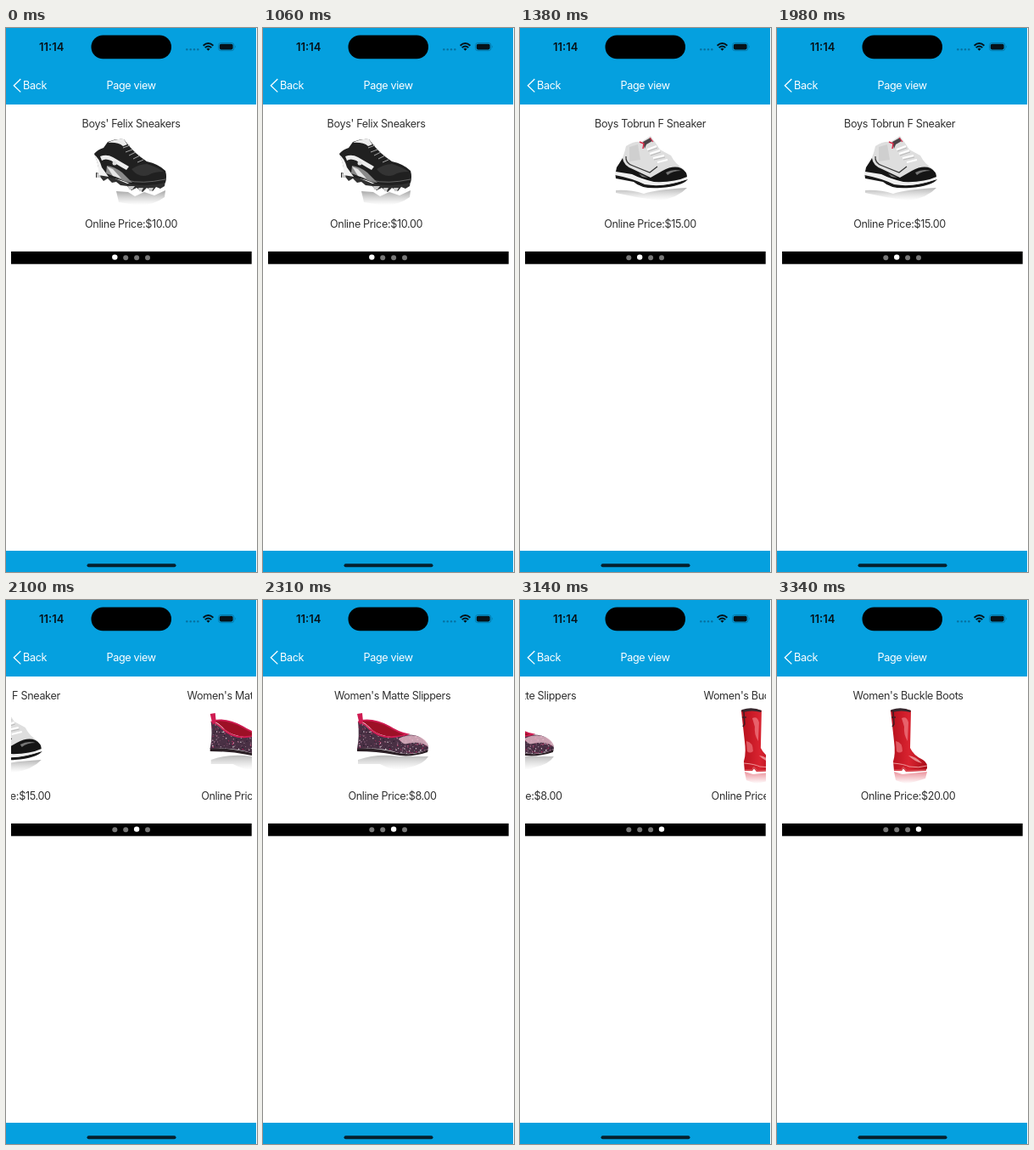
An HTML page that plays this animation: 296x640 px, repeating every 3440 ms.

```html
<!DOCTYPE html>
<html lang="en">
<head>
<meta charset="utf-8">
<title>Page view</title>
<style>
html, body { margin: 0; width: 100%; height: 100%; overflow: hidden; background: #fff; }
svg { display: block; width: 296px; height: 640px; }
text { font: 12.6px Inter, Roboto, sans-serif; letter-spacing: -0.34px; }
.label { fill: #303030; text-anchor: middle; }
</style>
</head>
<body>
<svg viewBox="0 0 296 640" xmlns="http://www.w3.org/2000/svg">
  <defs>
    <clipPath id="view"><rect x="6" y="90" width="284" height="172"/></clipPath>
    <linearGradient id="fade" x1="0" y1="0" x2="0" y2="1">
      <stop offset="0" stop-color="#666" stop-opacity=".6"/>
      <stop offset="1" stop-color="#999" stop-opacity="0"/>
    </linearGradient>
    <linearGradient id="redFade" x1="0" y1="0" x2="0" y2="1">
      <stop offset="0" stop-color="#d8283a" stop-opacity=".5"/>
      <stop offset="1" stop-color="#d8283a" stop-opacity="0"/>
    </linearGradient>
    <linearGradient id="bootRed" x1="0" y1="0" x2="1" y2="0">
      <stop offset="0" stop-color="#b5101c"/>
      <stop offset=".5" stop-color="#d92330"/>
      <stop offset="1" stop-color="#a80d18"/>
    </linearGradient>
    <clipPath id="flatBody"><path d="M112 143Q118 145 124 151Q139 164 158 160Q177 156 186 162Q196 168 195 176Q178 183 160 180Q138 173 111 175Q114 160 112 143Z"/></clipPath>
  </defs>

  <rect width="296" height="640" fill="#fff"/>
  <g clip-path="url(#view)">
    <g id="strip">
      <g class="page">
        <path d="M130 192L144 193L152 198L163 193L175 197L188 191L187 199Q172 210 152 208L133 205Z" fill="url(#fade)"/>
        <path d="M106 170L121 174L143 183L188 180L187 186L182 189L177 187L173 192L166 188L161 193L154 188L148 191L143 186L135 185L130 181L125 182L120 177L115 180L111 175L106 176Z" fill="#303030"/>
        <path d="M144 186h8l-3 4h-4ZM156 188h6l-2 4h-3ZM168 188h6l-2 4h-3ZM107 171l5 1-1 4h-4Z" fill="#c9c9c9"/>
        <path d="M104 148Q108 143 115 141L120 134Q130 130 139 131L143 136Q151 147 166 157Q180 160 188 168Q190 175 188 182Q168 187 148 184Q136 178 122 176L110 173Q110 162 104 148Z" fill="#202020"/>
        <path d="M120 135Q130 130 139 131L143 137L138 139Q132 134 120 135Z" fill="#ececec"/>
        <path d="M104 149Q110 153 113 164L121 175L109 173Q110 162 104 149Z" fill="#f2f2f2"/>
        <path d="M111 151Q119 148 126 152L145 163L142 167Q131 161 124 156Q117 153 113 156Z" fill="#ededed"/>
        <path d="M119 162Q128 163 137 170L149 182Q139 181 129 175L118 171Z" fill="#8a8a8a"/>
        <path d="M119 163L126 166L136 177L126 174Z" fill="#e5e5e5"/>
        <path d="M148 166Q157 160 166 160Q177 163 186 169Q174 169 168 173Q157 177 148 166Z" fill="#343434"/>
        <path d="M138 141l8-3M141 146l8-3M145 150l8-4M150 154l8-4M155 158l7-3" stroke="#aaa" stroke-width="1"/>
        <path d="M142 179Q160 184 188 178" stroke="#777" fill="none" stroke-width=".8"/>
        <circle cx="128" cy="159" r="2.5" fill="#ddd"/>
      </g>
      <g class="page">
        <g transform="translate(-6)">
          <path d="M113 191Q130 190 146 195Q160 190 197 188Q186 200 164 203Q139 200 113 194Z" fill="url(#fade)" opacity=".8"/>
          <path d="M112 169L118 172Q132 175 143 182Q164 187 183 182L198 178Q191 186 166 188Q144 190 134 181L113 177Z" fill="#181818"/>
          <path d="M112 168Q132 170 145 179Q165 184 197 175L197 178Q170 188 147 184Q133 177 112 173Z" fill="#efefef"/>
          <path d="M115 163Q122 154 125 139Q134 133 143 134L154 127Q160 135 165 143L178 150Q183 160 193 166L197 175Q178 181 155 180Q139 176 115 163Z" fill="#dedede"/>
          <path d="M114 164Q118 158 121 153Q122 162 133 166L154 176L168 168Q181 161 190 165Q197 169 197 175Q182 182 158 181Q144 178 132 172L113 169Z" fill="#151515"/>
          <path d="M125 151Q124 159 133 162L153 170L162 163" fill="none" stroke="#333" stroke-width="1.2"/>
          <path d="M129 140L139 137L142 155L129 157Z" fill="#cfcfcf"/>
          <path d="M145 134L154 129L156 133L149 137L147 142Z" fill="#4a4145"/>
          <path d="M141 134L146 136L145 142" fill="none" stroke="#d72b4a" stroke-width="1.5"/>
          <path d="M153 129l4 5" stroke="#d72b4a" stroke-width="1.2"/>
          <path d="M150 143l11-4M153 148l12-4M157 153l13-3M162 158l12-3" stroke="#fff" stroke-width="2"/>
          <path d="M151 145l11-4M154 150l12-4M158 155l13-3" stroke="#a9a9a9" stroke-width=".7"/>
          <path d="M172 170Q181 165 190 168Q180 168 174 173ZM140 171L151 176L144 175Z" fill="#777"/>
        </g>
      </g>
      <g class="page">
        <g transform="translate(-5)">
          <path d="M112 188Q135 180 160 184L195 184Q190 193 172 197Q158 204 138 193L112 193Z" fill="url(#fade)" opacity=".75"/>
          <path d="M111 174Q137 174 160 180Q180 184 195 175L194 179Q173 186 155 182Q134 178 111 178Z" fill="#2b2026"/>
          <path d="M112 143Q118 145 124 151Q139 164 158 160Q177 156 186 162Q196 168 195 176Q178 183 160 180Q138 173 111 175Q114 160 112 143Z" fill="#493044"/>
          <g id="glitter" clip-path="url(#flatBody)"></g>
          <path d="M160 163Q174 156 187 162Q195 167 195 173Q186 165 170 169Q165 171 160 163Z" fill="#e9bccb" opacity=".8"/>
          <path d="M114 142Q128 139 146 147Q161 156 169 158Q157 163 145 160Q131 157 125 149Q120 144 114 142Z" fill="#9d1026"/>
          <path d="M112 143Q120 145 126 152Q139 163 154 161Q164 160 170 158Q160 156 149 149Q131 139 115 142" fill="none" stroke="#cf1c52" stroke-width="1.8"/>
          <path d="M111 134L117 133L118 143L114 147Z" fill="#cf1c52"/>
        </g>
      </g>
      <g class="page">
        <g transform="translate(-7)">
          <path d="M138 202L148 205L177 202L175 210Q160 215 151 216L140 212Z" fill="url(#redFade)"/>
          <path d="M134 130Q146 126 158 130L157 174Q161 183 172 188Q178 192 177 198L175 201L152 202L148 197L147 201H138L137 190Q140 181 138 166Z" fill="url(#bootRed)"/>
          <path d="M135 129Q147 125 158 130L157 132Q147 129 136 132Z" fill="#36282e"/>
          <path d="M134 130l3 1 1 15 -2 3M135 138h5" fill="none" stroke="#431b21" stroke-width="1.6"/>
          <path d="M147 139Q153 136 155 144L154 166Q149 158 150 149Z" fill="#ef7880" opacity=".75"/>
          <path d="M140 166Q148 167 148 178Q144 181 141 178Z" fill="#ec737b" opacity=".7"/>
          <path d="M155 183Q164 184 171 192Q162 190 155 183Z" fill="#f3a2a5" opacity=".8"/>
          <path d="M137 192Q150 193 156 196Q167 198 177 195" fill="none" stroke="#ef9799"/>
          <path d="M138 200h9l2-3 4 4 23-1" fill="none" stroke="#d74b53" stroke-width="1.5"/>
        </g>
      </g>
    </g>
  </g>

  <rect x="6" y="262.9" width="283.7" height="14.8" fill="#000"/>
  <g id="dots"></g>

  <rect width="295" height="90" fill="#05a0df"/>
  <rect y="615" width="295" height="25" fill="#05a0df"/>
  <rect x="95.5" y="630.2" width="105" height="4" rx="2" fill="#05202e"/>
  <rect x="100.5" y="8.5" width="94.5" height="27.8" rx="13.9" fill="#000"/>
  <text x="39" y="26.7" style="font-size:13px;font-weight:600;letter-spacing:0" fill="#061219">11:14</text>
  <g fill="#0672a2">
    <circle cx="213.3" cy="25.3" r="1.2"/><circle cx="217.7" cy="25.3" r="1.2"/>
    <circle cx="222" cy="25.3" r="1.2"/><circle cx="226.3" cy="25.3" r="1.2"/>
  </g>
  <g fill="none" stroke="#061219" stroke-width="1.9">
    <path d="M232.6 20.7Q238.5 15.3 244.4 20.7M234.7 23.1Q238.5 19.8 242.3 23.1"/>
    <path d="M236.4 24.6Q238.5 23.1 240.6 24.6L238.5 26.8Z" fill="#061219" stroke="none"/>
  </g>
  <rect x="250.5" y="17.5" width="18.4" height="9.2" rx="2.9" fill="none" stroke="#0571a0" stroke-width=".8"/>
  <rect x="251.8" y="18.8" width="15.8" height="6.6" rx="1.8" fill="#061219"/>
  <path d="M270 20.6q1.4 1.5 0 3Z" fill="#0571a0"/>
  <path d="M17.3 60L9.3 67.7L17.3 75.4" fill="none" stroke="#fff" stroke-width="1.3"/>
  <text x="20" y="72" fill="#fff">Back</text>
  <text x="147.6" y="72" fill="#fff" text-anchor="middle">Page view</text>
</svg>
<script>
const NS = "http://www.w3.org/2000/svg";
const LOOP = 3440, STRIDE = 284;
const items = [
  ["Boys' Felix Sneakers", "$10.00"],
  ["Boys Tobrun F Sneaker", "$15.00"],
  ["Women's Matte Slippers", "$8.00"],
  ["Women's Buckle Boots", "$20.00"]
];
// Each swipe: step times, pixels dragged first, pixels left at rest
const swipes = [
  { times: [1060, 1160, 1270, 1380], drag: 14, rest: 6 },
  { times: [1980, 2100, 2210, 2310], drag: 3, rest: 5 },
  { times: [3020, 3140, 3240, 3340], drag: 7, rest: 7 }
];
const glide = [0, 0.53, 0.9, 1];

function add(parent, tag, attrs, text) {
  const el = document.createElementNS(NS, tag);
  for (const k in attrs) el.setAttribute(k, attrs[k]);
  if (text) el.textContent = text;
  parent.appendChild(el);
  return el;
}

const strip = document.getElementById("strip");
document.querySelectorAll(".page").forEach((page, i) => {
  page.setAttribute("transform", `translate(${i * STRIDE})`);
  const [name, price] = items[i];
  add(page, "text", { class: "label", x: 147.6, y: 117 }, name);
  add(page, "text", { class: "label", x: 147.6, y: 234.6 }, "Online Price:" + price);
});

let seed = 7;
const random = () => (seed = (seed * 16807) % 2147483647) / 2147483647;
const glitter = document.getElementById("glitter");
const sparkle = ["#8f6680", "#bd819b", "#21172a", "#c32761", "#ddd0d8"];
for (let i = 0; i < 420; i++) {
  add(glitter, "circle", {
    cx: 110 + random() * 86, cy: 143 + random() * 39,
    r: 0.35 + random() * 0.45, fill: sparkle[Math.floor(random() * sparkle.length)]
  });
}

const dotsBox = document.getElementById("dots");
const dots = items.map((_, i) => add(dotsBox, "circle", { cx: 128.3 + i * 12.9 }));

function scrollAt(t) {
  let pos = 0;
  swipes.forEach((s, i) => {
    const step = s.times.filter(at => t >= at).length - 1;
    if (step < 0) return;
    const from = i * STRIDE + s.drag, to = (i + 1) * STRIDE - s.rest;
    pos = from + (to - from) * glide[step];
  });
  return pos;
}

function draw(t) {
  const pos = scrollAt(t), current = Math.round(pos / STRIDE);
  strip.setAttribute("transform", `translate(${-pos})`);
  dots.forEach((dot, i) => {
    const on = i === current;
    dot.setAttribute("cy", on ? 269.6 : 270.3);
    dot.setAttribute("r", on ? 3.2 : 3);
    dot.setAttribute("fill", on ? "#fff" : "#777");
  });
}

const start = performance.now();
function tick() {
  draw((performance.now() - start) % LOOP);
  requestAnimationFrame(tick);
}
tick();
</script>
</body>
</html>
```
